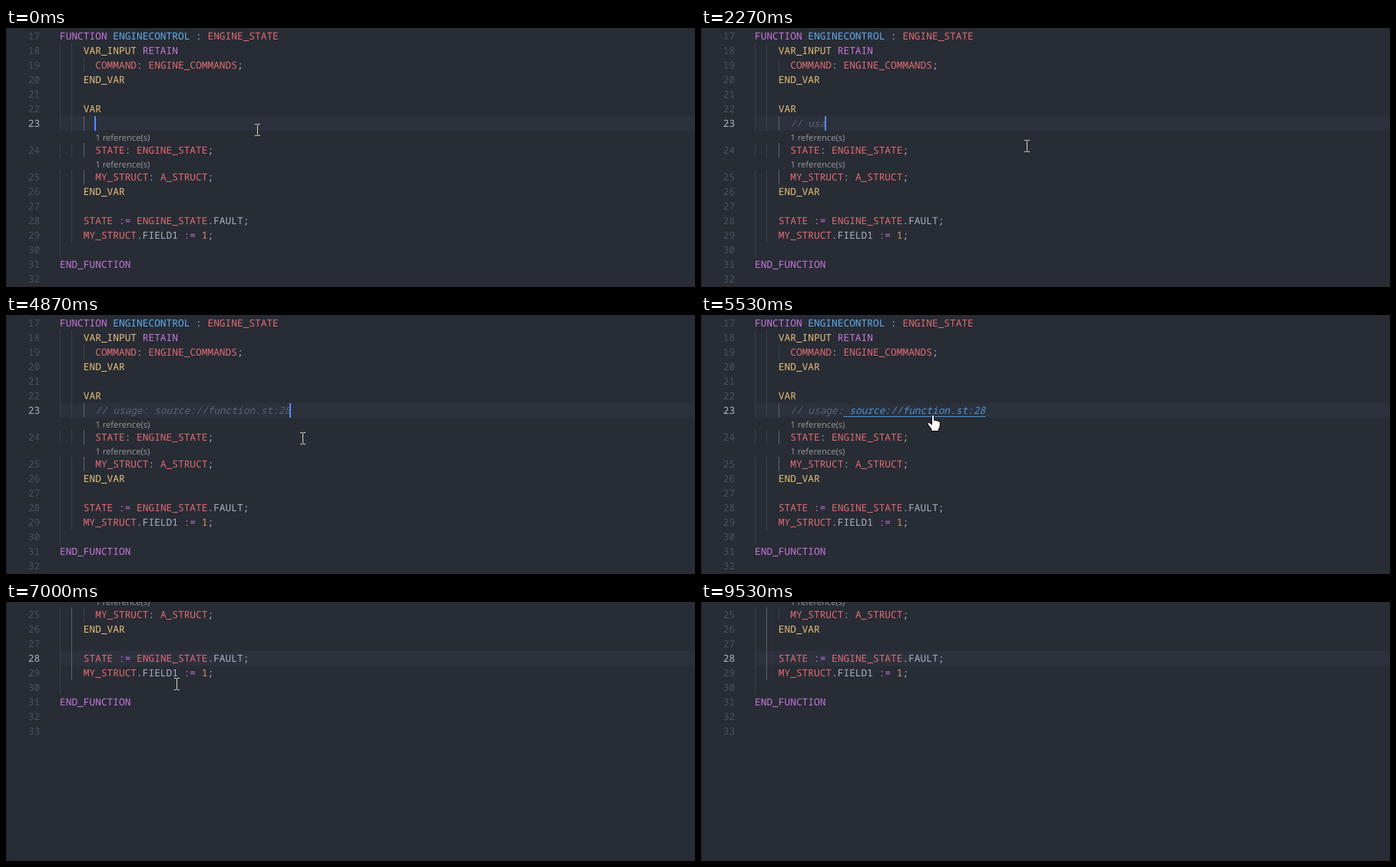
Animation, 897 px wide and 338 px high, one loop 9600 ms. Source, as an HTML page:

```html
<!DOCTYPE html>
<html lang="en">
<head>
<meta charset="utf-8">
<title>Source links in comments</title>
<style>
  html, body { margin: 0; width: 100%; height: 100%; overflow: hidden; background: #282c34; }
  svg { display: block; width: 897px; height: 338px; }
  text {
    font: 12.833px "Noto Sans Mono", "DejaVu Sans Mono", monospace;
    fill: #abb2bf;
    text-rendering: geometricPrecision;
  }
  .keyword { fill: #c678dd; }
  .block { fill: #e5c07b; }
  .func { fill: #61afef; }
  .number { fill: #d19a66; }
  .name { fill: #e06c75; }
  .gutter { fill: #495162; text-anchor: end; }
  .gutter.current { fill: #abb2bf; }
  .lens, .tip { font: 11.2px "Open Sans", "Noto Sans", sans-serif; fill: #999; }
  .tip { fill: #abb2bf; }
  .comment { fill: #5c6370; font-style: italic; }
  .guide { fill: #3b4048; }
  .before .inner, .after .outer { fill: #606369; }
  .active #link, .active #underline { fill: #4e94ce; }
  #underline { fill: #5c6370; }
  #row { fill: #2c313c; }
  #caret { fill: #528bff; }
  .panel { fill: #212428; stroke: #181a1f; }
  .pick { fill: #d7dae0; }
  .icon { fill: none; stroke: #c5c5c5; }
  #beam { fill: none; stroke: #fff; mix-blend-mode: difference; }
  #hand { fill: #fff; stroke: #000; stroke-linejoin: round; }
</style>
</head>
<body>
<svg id="stage" class="before" viewBox="0 0 897 338">
  <rect width="897" height="338" fill="#282c34"/>
  <rect width="1" height="338" fill="#1f2228"/>
  <g id="doc">
    <rect id="row" x="70" y="115" width="827" height="19"/>
    <g id="guides"></g>
    <g id="code"></g>
    <text id="note" class="comment" x="116.2" y="129"></text>
    <text id="link" class="comment" x="193.2" y="129"></text>
    <rect id="underline" x="185.5" y="132" width="184.8" height="1"/>
    <rect id="caret" width="2" height="19"/>
  </g>
  <g id="menu">
    <rect class="panel" x="193.5" y="134.5" width="710" height="117"/>
    <rect x="194" y="135" width="703" height="19" fill="#2c313a"/>
  </g>
  <g id="hover">
    <rect class="panel" x="195.5" y="94.5" width="156" height="20"/>
    <text class="tip" x="203" y="109">Follow link (ctrl + click)</text>
  </g>
  <path id="beam" d="M-3-7.5H0M1-7.5H4M.5-7V7M-3 7.5H0M1 7.5H4"/>
  <path id="hand" d="M-1.5 1.5Q0-1 1.5 1.5V7.5Q3 6.3 4.2 8Q5.8 7 7 8.8Q9 8.2 9.3 10.5V14Q9 17 7.5 18.5V21.5H-2V19L-6.5 13Q-7.5 11-6 10.3Q-4.5 10-1.5 13Z"/>
</svg>
<script>
const $ = id => document.getElementById(id);
const LOOP = 9600, STEP = 200 / 3;
const CHAR = 7.7, LEFT = 70, ROW = 19;
const NOTE = "// usage: ", LINK = "source://function.st:28";

// First line is number 17.
const lines = [
  "FUNCTION ENGINECONTROL : ENGINE_STATE",
  "    VAR_INPUT RETAIN",
  "      COMMAND: ENGINE_COMMANDS;",
  "    END_VAR",
  "",
  "    VAR",
  "",
  "      STATE: ENGINE_STATE;",
  "      MY_STRUCT: A_STRUCT;",
  "    END_VAR",
  "",
  "    STATE := ENGINE_STATE.FAULT;",
  "    MY_STRUCT.FIELD1 := 1;",
  "",
  "END_FUNCTION",
  "",
  ""
];
const depths = "02322233322221000";
const menuItems = ["IF ...", "VAR ...", "VAR_TEMP ... END_VAR", "VAR_INPUT ... END_VAR",
  "VAR_IN_OUT ... END_VAR", "VAR_OUTPUT ... END_OUTPUT"];

function add(parent, tag, attrs, content) {
  const el = document.createElementNS("http://www.w3.org/2000/svg", tag);
  for (const key in attrs) el.setAttribute(key, attrs[key]);
  if (content) el.textContent = content;
  return parent.appendChild(el);
}

const tokens = /(?<keyword>FUNCTION|END_FUNCTION|RETAIN|:=)|(?<block>VAR_INPUT|END_VAR|VAR)\b|(?<func>ENGINECONTROL)|(?<plain>\.\w+)|(?<number>\d+)|(?<name>\w+)|[^\w]/g;

function drawCode(source, y) {
  const indent = source.search(/\S/);
  if (indent < 0) return;
  const text = add($("code"), "text", { x: LEFT + indent * CHAR, y });
  for (const m of source.trim().matchAll(tokens)) {
    const kind = Object.keys(m.groups).find(k => m.groups[k]) || "plain";
    add(text, "tspan", { class: kind }, m[0]);
  }
}

const gutter = {};
let lineTop = 1;
lines.forEach((source, i) => {
  const n = 17 + i;
  if (n === 24 || n === 25) {
    add($("code"), "text", { class: "lens", x: 116.4, y: lineTop + 13 }, "1 reference(s)");
    lineTop += 16;
  }
  for (let d = 0; d < +depths[i]; d++) {
    const part = d === 1 ? "outer" : d === 2 && n > 22 ? "inner" : "";
    add($("guides"), "rect", { class: "guide " + part,
      x: Math.round(LEFT + d * 2 * CHAR), y: lineTop, width: 1, height: ROW });
  }
  gutter[n] = add($("code"), "text", { class: "gutter", x: 44.2, y: lineTop + 14 }, n);
  drawCode(source, lineTop + 14);
  lineTop += ROW;
});

menuItems.forEach((label, i) => {
  const y = 135 + i * ROW;
  add($("menu"), "path", { class: "icon", d: `M198.5 ${y + 15}V${y + 4.5}h12V${y + 15}` });
  add($("menu"), "path", { class: "icon", "stroke-dasharray": "2 1.25", d: `M198 ${y + 15.5}h13` });
  add($("menu"), "text", { class: i ? "" : "pick", x: 216, y: y + 14 }, label);
});

// [time, characters written]
const typing = [[0, 0], [730, 1], [870, 2], [1270, 3], [1930, 4], [2000, 5], [2270, 6],
  [2470, 7], [2600, 8], [3130, 9], [3270, 10], [3870, 33]];
// Spans in which the caret is hidden
const blinks = [[330, 730], [1800, 1930], [3070, 3130], [4400, 4870], [5400, 5930],
  [6730, 7200], [7730, 8200], [8730, 9200], [9530, 9600]];
// [time, x, y]
const pointer = [[0, 324, 132], [70, 372, 145], [130, 424, 154], [4470, 424, 154],
  [4530, 425, 155], [4670, 425, 155], [4870, 386, 161], [5200, 332, 148],
  [5600, 296, 127], [6600, 296, 127], [7000, 223, 107], [7270, 177, 100],
  [7670, 177, 100], [8270, 170, 190], [8670, 150, 352], [9601, 150, 352]];

function pointerAt(t) {
  const i = pointer.findIndex(p => p[0] > t);
  const [t0, x0, y0] = pointer[i - 1], [t1, x1, y1] = pointer[i];
  const f = (t - t0) / (t1 - t0);
  return [Math.round(x0 + (x1 - x0) * f), Math.round(y0 + (y1 - y0) * f)];
}

const within = (t, a, b) => t >= a && t < b;
const show = (id, on) => $(id).setAttribute("visibility", on ? "visible" : "hidden");

function render(time) {
  const t = Math.floor((time + 4) / STEP) % Math.round(LOOP / STEP) * STEP + 4;
  const jumped = t >= 6200;
  const active = within(t, 5400, 6200);
  const menu = within(t, 3400, 3870);
  const count = typing.filter(k => k[0] <= t).pop()[1];

  $("stage").setAttribute("class", (jumped ? "after" : "before") + (active ? " active" : ""));
  $("doc").setAttribute("transform", `translate(0 ${jumped ? -178 : 0})`);
  $("note").textContent = NOTE.slice(0, count);
  $("link").textContent = LINK.slice(0, Math.max(0, count - NOTE.length));
  gutter[23].classList.toggle("current", !jumped);
  gutter[28].classList.toggle("current", jumped);

  const y = jumped ? 242 : 115;
  const col = jumped ? 0 : t >= 6130 ? 29 : 6 + count;
  $("row").setAttribute("y", y);
  $("caret").setAttribute("y", y);
  $("caret").setAttribute("x", col ? Math.floor(LEFT + col * CHAR) - 1 : LEFT);
  show("caret", !blinks.some(([a, b]) => within(t, a, b)));
  show("underline", within(t, 5000, 6200));
  show("menu", menu);
  show("hover", within(t, 5870, 6130));

  const hand = menu || within(t, 5400, 6130);
  const [px, py] = pointerAt(t);
  for (const id of ["beam", "hand"]) $(id).setAttribute("transform", `translate(${px} ${py})`);
  show("hand", hand);
  show("beam", !hand);
}

const start = performance.now();
function tick() {
  render(performance.now() - start);
  requestAnimationFrame(tick);
}
tick();
</script>
</body>
</html>
```
